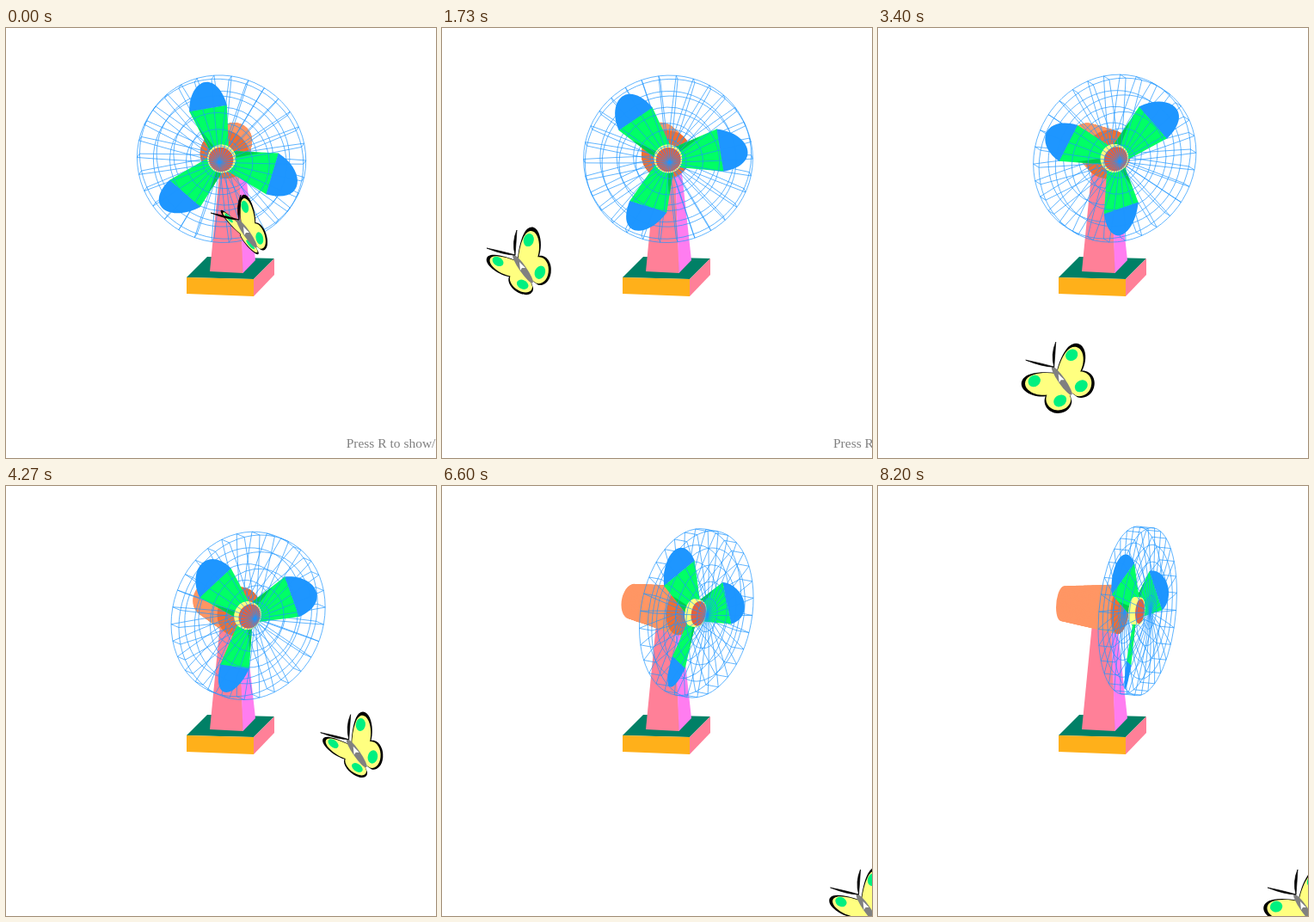
Write an HTML page with a canvas that moves like this. It is 500 by 500 pixels and loops after 8.27 s.

```html
<!DOCTYPE html>
<html>
<head>
<meta charset="utf-8">
<style>
html, body { margin: 0; width: 100%; height: 100%; overflow: hidden; background: #fff; }
canvas { display: block; }
</style>
</head>
<body>
<canvas id="stage" width="500" height="500"></canvas>
<script>
const ctx = document.getElementById('stage').getContext('2d');
const LOOP = 8270, STEPS = 124, RAD = Math.PI / 180, TAU = Math.PI * 2;
const BLUE = '#1e96ff', GREEN = '#00ff66', YELLOW = '#ffff80', PINK = '#ff8098';

// The pointer rests briefly at each stop, one leg lasting LEG steps.
const LEG = 13;
const STOPS = [[280, 239], [195, 140], [94, 280], [139, 418], [215, 410],
  [411, 309], [255, 433], [115, 400], [680, 536]];

function pointer(n) {
  const i = Math.min(STOPS.length - 2, Math.floor(n / LEG));
  const f = Math.min(1, n / LEG - i), ease = f * f * (3 - 2 * f);
  const [x, y] = [0, 1].map(j => STOPS[i][j] + (STOPS[i + 1][j] - STOPS[i][j]) * ease);
  return [Math.min(x, 495), Math.min(y, 491)];
}

// Steady rates with a slow drift over the loop, in degrees.
const drift = (n, start) => Math.sin(TAU * (n - start) / STEPS);
const spinAt = n => 15.8 * n + 23 * drift(n, 73) - 8;
const flapAt = n => 45.45 * n + 50 * drift(n, 60) + 38;

function poly(color, ...p) {
  ctx.beginPath();
  for (let i = 0; i < p.length; i += 2) ctx.lineTo(p[i], p[i + 1]);
  ctx.fillStyle = color;
  ctx.fill();
}

// Adds a path in the plane spanned by screen vectors u and v.
function inPlane(o, u, v, path) {
  ctx.save();
  ctx.transform(u[0], u[1], v[0], v[1], o[0], o[1]);
  path();
  ctx.restore();
}

function fillPlane(color, o, u, v, path) {
  ctx.beginPath();
  inPlane(o, u, v, path);
  ctx.fillStyle = color;
  ctx.fill();
}

function stand() {
  poly('#008066', 210, 290, 234, 266, 312, 268, 288, 292);
  poly('#ffb01a', 210, 290, 288, 292, 288, 312, 210, 309);
  poly(PINK, 288, 292, 312, 268, 312, 287, 288, 312);
  poly(PINK, 237, 283, 276, 285, 271, 160, 249, 160);
  poly('#ff7df0', 275.5, 285, 290, 270, 278, 160, 271, 160);
}

function head(spin) {
  const yaw = (-9.6 + spin * 0.0396) * RAD, c = Math.cos(yaw), s = Math.sin(yaw), tilt = 0.242;
  const vec = (x, y, z) => [x * c + z * s, z * tilt * c - y * 0.97 - x * s * tilt];
  const point = (x, y, z) => { const v = vec(x, y, z); return [258.3 + v[0], 141 + v[1]]; };
  const circle = (z, r) =>
    inPlane(point(0, 0, z), vec(r, 0, 0), vec(0, r, 0), () => {
      ctx.moveTo(1, 0);
      ctx.arc(0, 0, 1, 0, TAU);
    });

  function disc(color, z, r) {
    ctx.beginPath();
    circle(z, r);
    ctx.fillStyle = color;
    ctx.fill();
  }

  // A shallow drum with slightly domed lids; side is -1 for the back lid.
  function cage(side) {
    const rings = 5, spokes = 30, radius = 98, mid = 47;
    const depth = i => mid + side * (16 - 7 * (i / rings) ** 2);
    ctx.beginPath();
    for (let i = 1; i <= rings; i++) circle(depth(i), radius * i / rings);
    for (let k = 0; k < spokes; k++) {
      const x = radius * Math.cos(k * TAU / spokes), y = radius * Math.sin(k * TAU / spokes);
      ctx.moveTo(...point(x, y, mid));
      for (let i = rings; i >= 0; i--) ctx.lineTo(...point(x * i / rings, y * i / rings, depth(i)));
    }
    ctx.strokeStyle = BLUE;
    ctx.lineWidth = 0.7;
    ctx.stroke();
  }

  function blade(deg) {
    const a = deg * RAD, ca = Math.cos(a), sa = Math.sin(a);
    const p = Math.cos(15 * RAD), q = -Math.sin(15 * RAD);
    const part = (color, path) =>
      fillPlane(color, point(0, 0, 45), vec(ca, sa, 0), vec(-sa * p, ca * p, q), path);
    const corners = (...pts) => () => {
      for (let i = 0; i < pts.length; i += 2) ctx.lineTo(pts[i], pts[i + 1]);
    };
    part(GREEN, corners(10, -12, 62, -25, 62, 25, 10, 12));
    part('#00cc50', corners(10, 12, 42, 19.5, 14, 5));
    part(BLUE, () => {
      ctx.moveTo(61.5, 25);
      ctx.bezierCurveTo(100, 14, 107, -24, 61.5, -25);
    });
  }

  for (let z = -47; z <= 25; z++) disc('#ff9664', z, 20.5 + (z + 47) / 72 * 8.5);
  disc('#f06e32', 25, 29);
  cage(-1);
  for (let i = 0; i < 3; i++) blade(101 + spin + i * 120);
  for (let z = 42; z <= 50; z++) disc(YELLOW, z, 16);
  disc('#e26040', 50, 14.5);
  cage(1);
}

function wing() {
  ctx.moveTo(12, 1);
  ctx.bezierCurveTo(18, 8, 24, 16, 27, 25);
  ctx.bezierCurveTo(31, 37, 24, 44, 15, 42);
  ctx.bezierCurveTo(6, 40, -1, 32, -4, 26);
  ctx.bezierCurveTo(-10, 35, -22, 34, -28, 26);
  ctx.bezierCurveTo(-35, 17, -31, 7, -26, 4);
  ctx.quadraticCurveTo(-20, 1, -14, 1);
}

function butterfly(x, y, flap) {
  const along = [-0.57, -0.82], across = [0.82, -0.57];
  const fold = (35 + 35 * Math.cos(flap * RAD)) * RAD, cf = Math.cos(fold), sf = Math.sin(fold);
  for (const side of [-1, 1]) {
    const out = [0, 1].map(i => (side * cf + 0.19 * sf) * across[i] + 0.37 * sf * along[i]);
    const part = (color, path) => fillPlane(color, [x, y], along, out, path);
    part('#000', wing);
    part(YELLOW, () => { ctx.scale(0.91, 0.91); wing(); });
    part('#00f080', () => ctx.ellipse(18, 26.5, 6.5, 7.5, 0, 0, TAU));
    part('#00f080', () => ctx.ellipse(-18, 15, 6.5, 8, 0, 0, TAU));
  }
  fillPlane('#808080', [x, y], along, across, () => ctx.ellipse(0, 0, 20, 4, 0, 0, TAU));
  poly('#fff', x - 4, y - 8, x + 3, y - 1, x - 1, y - 1, x - 3, y + 2);
  ctx.beginPath();
  inPlane([x - 9, y - 16], [1, 0], [0, 1], () => {
    ctx.moveTo(0, 0);
    ctx.quadraticCurveTo(-13, -4, -33, -8);
    ctx.quadraticCurveTo(-13, 0, 0, 0);
    ctx.quadraticCurveTo(-4, -15, 2, -29);
    ctx.quadraticCurveTo(1, -13, 0, 0);
  });
  ctx.fillStyle = ctx.strokeStyle = '#000';
  ctx.lineWidth = 0.7;
  ctx.fill();
  ctx.stroke();
}

function frame() {
  const n = Math.min(STEPS - 1, Math.floor((performance.now() % LOOP + 5) * 15 / 1000));
  const spin = spinAt(n);
  ctx.fillStyle = '#fff';
  ctx.fillRect(0, 0, 500, 500);
  stand();
  head(spin);
  butterfly(...pointer(n), flapAt(n));
  ctx.fillStyle = '#808080';
  ctx.font = '15.5px "Liberation Serif", serif';
  ctx.fillText('Press R to show/hide', 395 + spin * 0.155, 488);
  requestAnimationFrame(frame);
}
frame();
</script>
</body>
</html>
```
